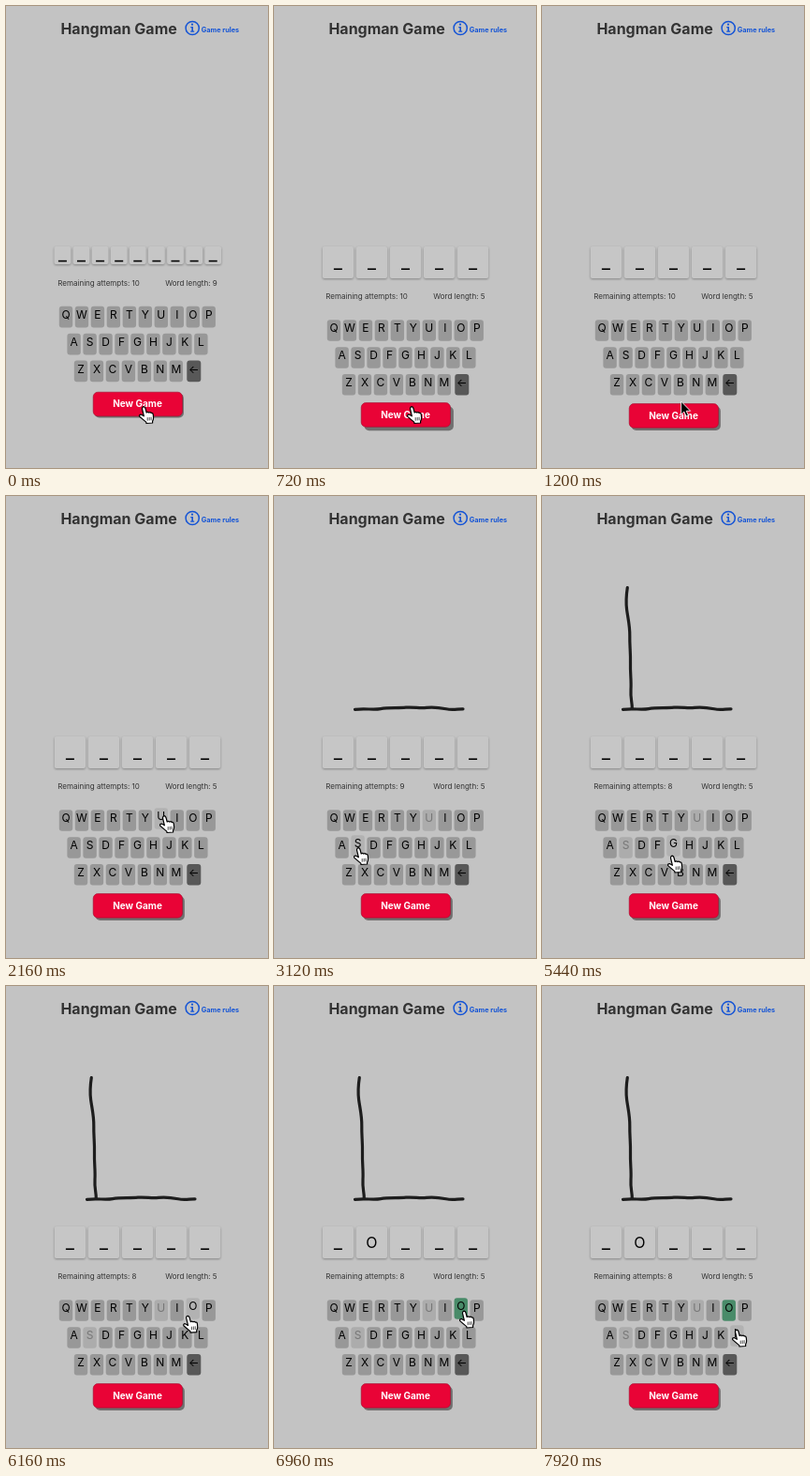
These frames come from a looping animation (280x492 px, 8 s). An HTML page:

```html
<!DOCTYPE html>
<html lang="en">
<head>
<meta charset="utf-8">
<title>Hangman</title>
<style>
  html, body { margin: 0; width: 100%; height: 100%; overflow: hidden; background: #c3c3c3; }
  svg { display: block; width: 100%; height: 100%; font-family: Inter, Roboto, sans-serif; }
  .mid { text-anchor: middle; }
  .tile { fill: #c6c6c6; filter: drop-shadow(.4px 1.2px .8px rgba(0, 0, 0, .32)); }
  .ink { fill: none; stroke: #1d1d1d; stroke-width: 3.2; stroke-linecap: round; stroke-linejoin: round; }
</style>
</head>
<body>
<svg id="stage" viewBox="0 0 280 492">
  <rect width="280" height="492" fill="#c3c3c3"/>
  <text class="mid" x="120.6" y="30" font-size="16" font-weight="700" fill="#333">Hangman Game</text>
  <g fill="#1454d6">
    <circle cx="199.2" cy="23.5" r="7.1" fill="none" stroke="#1454d6" stroke-width="1.5"/>
    <circle cx="199" cy="19.7" r="1.1"/>
    <path d="M197.3 22H200V26.6H201.2V27.8H197.2V26.6H198.4V23.2H197.3Z"/>
    <text x="208.8" y="28" font-size="7.3" font-weight="700">Game rules</text>
  </g>
  <path id="base" class="ink" d="M86.5 227.3C98 226 106 228 114 226.6S132 226 141 225.2 155 226.4 163 225.4 176 225.2 184 226.8 196 226.6 202 226.8"/>
  <path id="pole" class="ink" d="M91.3 97.5C90 106 89.6 113 90.6 121S94 138 93.8 149 94.8 166 94.5 178 95.6 196 95 206 96.4 219 96.3 226"/>
  <g id="tiles9"></g>
  <g id="tiles5"></g>
  <text id="letter" class="mid" x="104.3" y="279" font-size="16">O</text>
  <g id="board">
    <g font-size="8" fill="#333">
      <text id="left" x="55.3" y="297.5"></text>
      <text id="len" x="170.3" y="297.5"></text>
    </g>
    <g id="keys" class="mid" font-size="12"></g>
  </g>
  <g id="button">
    <rect id="shadow" x="93.2" width="95.3" height="25.6" rx="5" fill="#707070" style="filter:blur(.5px)"/>
    <rect x="93.2" width="95.3" height="25.6" rx="5" fill="#e90336" stroke="#a3092d" stroke-width=".6"/>
    <text class="mid" x="140.5" y="16" font-size="10" font-weight="700" fill="#fff">New Game</text>
  </g>
  <g id="cursor">
    <path id="arrow" d="M0 0V14L3.2 11 5.4 16 7.8 15 5.6 10.2H10Z" fill="#000" stroke="#fff" stroke-width=".9"/>
    <g id="hand" stroke="#000" stroke-linejoin="round" stroke-linecap="round">
      <path d="M-1.5 1.5Q-1.5-.8 .3-.8 1.6-.6 2 1L3.2 5.5Q4.5 4.4 5.8 5.6 7.2 4.7 8.3 6 10 5.6 10.3 7.6L10.6 11Q10.6 13 9.6 14.5V16.5L3 17 2.8 15.6Q-.5 13-4.3 9.6-4.8 7.4-2.6 7.6L.4 9.3Z" fill="#fff" stroke-width="1.2"/>
      <path d="M4.2 11V13.8M6.2 10.8V13.6M8.1 10.6V13.4" fill="none" stroke-width=".7"/>
    </g>
  </g>
</svg>
<script>
const LOOP = 8000;
const START = 160, MISS_U = 2320, MISS_S = 3300, HIT_O = 6600;
const $ = id => document.getElementById(id);

function add(parent, tag, attrs, text) {
  const el = document.createElementNS('http://www.w3.org/2000/svg', tag);
  for (const k in attrs) el.setAttribute(k, attrs[k]);
  if (text) el.textContent = text;
  parent.append(el);
  return el;
}
const show = (id, on) => $(id).setAttribute('visibility', on ? 'visible' : 'hidden');
const move = (el, x, y) => el.setAttribute('transform', `translate(${x} ${y})`);

function makeTiles(id, count, first, step, width, height, dash) {
  return Array.from({ length: count }, (_, i) => {
    const x = first + i * step;
    add($(id), 'rect', { class: 'tile', x: x - width / 2, y: 256, width, height, rx: 2 });
    return add($(id), 'rect', { x: x - 4.5, y: dash, width: 9, height: 1.6 });
  });
}
makeTiles('tiles9', 9, 60.4, 20.1, 17.8, 19, 270.8);
const dashes = makeTiles('tiles5', 5, 68.4, 36.05, 33.2, 34, 279.4);

const keys = [];
[['QWERTYUIOP', 64, 319.8], ['ASDFGHJKL', 72.6, 348.8], ['ZXCVBNM←', 80, 377.6]].forEach(([row, x0, y]) => {
  [...row].forEach((ch, i) => {
    const back = ch === '←';
    const x = x0 + i * 16.97 + (back ? 2 : 0), w = back ? 15 : 14.4;
    const g = add($('keys'), 'g', {});
    const box = add(g, 'rect', { x: x - w / 2, y, width: w, height: 22.6, rx: 3 });
    const label = add(g, 'text', { x, y: y + 13 }, ch);
    keys.push({ ch, x, y, w, g, box, label });
  });
});

// Pointer stops: arrival time, leaving time, position
const stops = [
  [0, 1040, 147, 427.5],
  [2000, 2500, 169, 341.5],
  [3120, 4320, 90, 375.5],
  [5240, 5640, 139, 384],
  [6320, 6960, 203, 347],
  [7760, 8000, 208, 367]
];

function pointer(t) {
  for (let i = 0; i < stops.length; i++) {
    const [, leave, x, y] = stops[i];
    if (t <= leave || i === stops.length - 1) return [x, y];
    const [arrive, , nx, ny] = stops[i + 1];
    if (t < arrive) {
      const p = (t - leave) / (arrive - leave), e = p * p * (3 - 2 * p);
      return [x + (nx - x) * e, y + (ny - y) * e];
    }
  }
}

function render(t) {
  const started = t >= START, drop = started ? 14.4 : 0;
  const [px, py] = pointer(t);
  const inside = (x, y, w, h) => px >= x && px <= x + w && py >= y && py <= y + h;
  const missed = { U: t >= MISS_U, S: t >= MISS_S };
  const solved = t >= HIT_O;

  show('tiles9', !started);
  show('tiles5', started);
  show('base', missed.U);
  show('pole', missed.S);
  show('letter', solved);
  dashes[1].setAttribute('opacity', solved ? 0 : 1);
  $('left').textContent = 'Remaining attempts: ' + (10 - missed.U - missed.S);
  $('len').textContent = 'Word length: ' + (started ? 5 : 9);
  move($('board'), 0, drop);

  let hand = false;
  for (const k of keys) {
    const off = missed[k.ch];
    const over = !off && inside(k.x - k.w / 2, k.y + drop - 2, k.w, 24.6);
    hand = hand || over;
    const fill = k.ch === '←' ? '#585858'
      : k.ch === 'O' && solved ? '#498b69'
      : off ? '#acacac'
      : over ? '#b2b2b2' : '#989898';
    k.box.setAttribute('fill', fill);
    k.label.setAttribute('fill', off ? '#777' : '#000');
    move(k.g, 0, over ? -2 : 0);
  }

  const hover = inside(93, 409 + drop, 95.5, 26);
  const pressed = t < START;
  move($('button'), 0, 409.2 + drop + (pressed ? 2 : hover ? -1 : 0));
  const depth = pressed ? 1.7 : hover ? 4 : 2.8;
  move($('shadow'), depth * .85, depth);

  hand = hand || hover;
  show('hand', hand);
  show('arrow', !hand);
  move($('cursor'), px, py);
}

function tick() {
  render(performance.now() % LOOP);
  requestAnimationFrame(tick);
}
tick();
</script>
</body>
</html>
```
